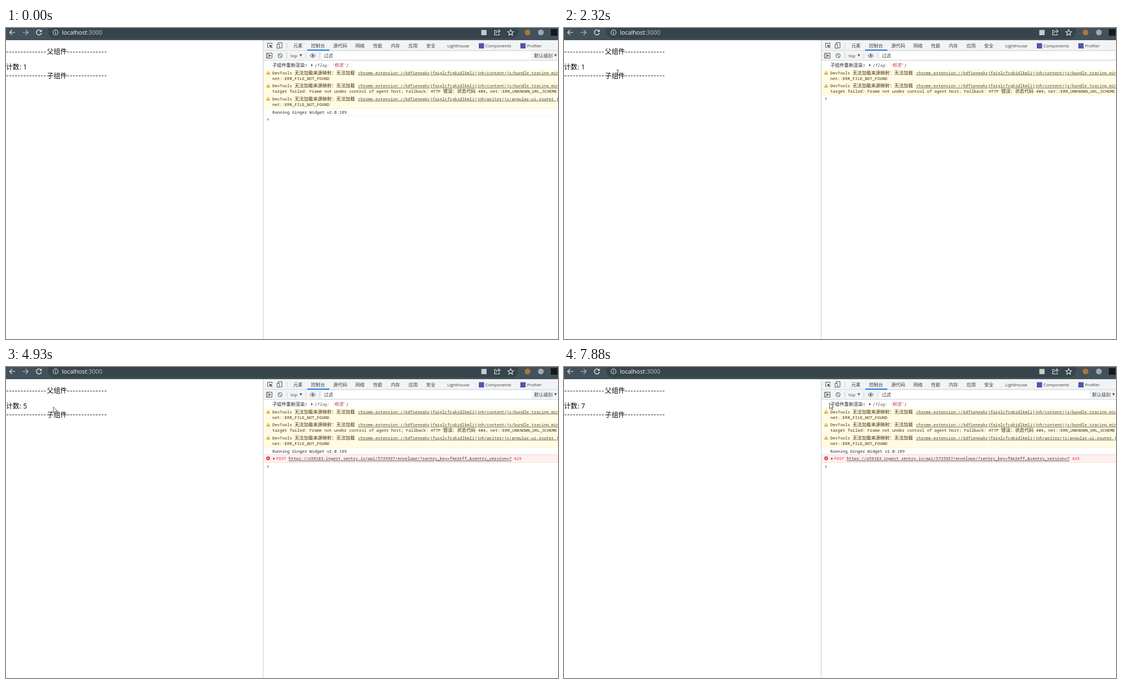
Animation, 997 px wide and 562 px high, one loop 8000 ms. Source, as an HTML page:

```html
<!DOCTYPE html>
<html lang="zh-CN">
<head>
<meta charset="utf-8">
<title>父子组件渲染</title>
<style>
html, body { margin: 0; width: 100%; height: 100%; overflow: hidden; background: #fff; }
svg { display: block; width: 997px; height: 562px; }
text { white-space: pre; }
.ui { font: 7.75px 'Open Sans', 'Noto Sans', sans-serif; fill: #3c4043; }
.cjk { font: 8.4px 'Noto Sans CJK SC', 'Noto Sans CJK', sans-serif; fill: #3c4043; }
.mono { font: 7.46px 'Noto Sans Mono', 'Noto Sans CJK SC', monospace; fill: #222; }
.mono .han { font-size: 8.4px; }
.page { font: 12.1px 'Noto Sans CJK SC', 'Noto Sans CJK', sans-serif; fill: #000; }
.latin { font: 12.3px 'Open Sans', 'Noto Sans', sans-serif; fill: #000; }
.dash { font: 13.5px 'Open Sans', 'Noto Sans', sans-serif; letter-spacing: .84px; fill: #111; }
.address { font: 10.8px 'Open Sans', 'Noto Sans', sans-serif; fill: #f8f9fa; }
.mono.warn { fill: #452b00; }
.mono.link { fill: #45432f; text-decoration: underline; }
.mono.error { fill: #e52b2b; }
.mono.url { fill: #3d2e31; text-decoration: underline; }
.mono.object { font-style: italic; fill: #565656; }
.string { fill: #c8262b; }
.line { fill: none; stroke: #50565b; stroke-width: 1; }
.light { fill: none; stroke: #e3e8ea; stroke-width: 1.1; }
</style>
</head>
<body>
<svg id="stage" viewBox="0 0 997 562"></svg>
<script>
const LOOP = 8000;

const text = (x, y, cls, str) => `<text x="${x}" y="${y}" class="${cls}">${str}</text>`;
const rect = (x, y, w, h, fill, extra = '') =>
  `<rect x="${x}" y="${y}" width="${w}" height="${h}" fill="${fill}" ${extra}/>`;
const path = (d, cls, extra = '') => `<path d="${d}" class="${cls}" ${extra}/>`;
const circle = (x, y, r, extra) => `<circle cx="${x}" cy="${y}" r="${r}" ${extra}/>`;
const group = (id, content) => `<g id="${id}">${content}</g>`;
const han = str => `<tspan class="han">${str}</tspan>`;

function browserBar() {
  return rect(0, 0, 997, 22, '#43525a') + rect(76, -8, 849, 27, '#37444b', 'rx="12"') +
    path('M16.500 8H7M11 3.500L6.500 8L11 12.500', 'light') +
    path('M30 8H39.500M35.500 3.500L40 8L35.500 12.500', 'light', 'opacity=".75"') +
    group('hover', circle(59.5, 8, 10.5, 'fill="#5b6970"')) +
    group('reload', path('M63 5A4.600 4.600 0 1 0 64 9', 'light', 'style="stroke-width:1.400"') +
      '<path d="M64.500 2.800V7H60.300Z" fill="#e3e8ea"/>') +
    group('stop', path('M55.500 4L63.500 12M63.500 4L55.500 12', 'light', 'style="stroke-width:1.300"')) +
    circle(89.5, 8, 4.5, 'class="light"') + path('M89.500 7.300V10.500M89.500 5.300V6.300', 'light') +
    text(101, 12, 'address', 'localhost<tspan fill="#bdc5c9">:3000</tspan>') +
    group('translate', rect(858.5, 3.5, 9.5, 9.5, '#c4cbcf')) +
    path('M886 4.500H882.500V12.500H891V10M885 9.500Q885.500 5.800 890 5.800M889 3L892.500 5.800L889 8.500', 'light') +
    path('M911.500 3L913 6.500L916.700 6.800L913.900 9.300L914.800 13L911.500 11L908.200 13L909.100 9.300L906.300 6.800L910 6.500Z', 'light') +
    circle(942, 8, 5.2, 'fill="#a8763c"') + circle(966, 8, 5.2, 'fill="#9daab0"') +
    rect(984, 2, 12, 12, '#17191b');
}

function page() {
  const heading = (y, name) => text(0.5, y - .6, 'dash', '-'.repeat(14)) +
    text(73.8, y, 'page', name) + text(110, y - .6, 'dash', '-'.repeat(14));
  return heading(47.4, '父组件') + heading(90.6, '子组件') +
    text(0, 75.2, 'page', '计数') + text(24.5, 75, 'latin', ':') +
    '<text id="count" x="31" y="75" class="latin"></text>';
}

function devtools() {
  const tabs = [[519, '元素'], [551, '控制台'], [591, '源代码'], [631, '网络'],
    [663, '性能'], [695, '内存'], [727, '应用'], [759, '安全']];
  const divider = (x, y) => rect(x, y, 1, 10, '#cfd2d5');
  return rect(465, 22, 532, 37, '#f1f3f4') + rect(464, 22, 1, 540, '#c9cccf') +
    rect(465, 40, 532, 1, '#d3d6d9') + rect(465, 58, 532, 1, '#d3d6d9') +
    rect(544, 39, 40, 2, '#1a73e8') +
    path('M475 35H472.500V27.500H480.500V30', 'line') +
    '<path d="M475.500 30L481.500 32.300L479 33.300L481.300 35.800L480.300 36.600L478 34.200L476.800 36.300Z" fill="#50565b"/>' +
    path('M491.500 29V26.500H498.500V36H494.500M489.500 29.500H494V36.500H489.500Z', 'line') + divider(507, 27) +
    tabs.map(([x, name]) => text(x, 35.200, 'cjk', name)).join('') +
    rect(854, 27.5, 9.5, 9.5, '#5254ae') + rect(929, 27.5, 9.5, 9.5, '#5254ae') +
    text(797, 34.8, 'ui', 'Lighthouse') + text(866, 34.8, 'ui', 'Components') + text(941, 34.8, 'ui', 'Profiler') +
    group('sidebar', path('M470.500 45.500H480.500V54.500H470.500ZM473 45.500V54.500', 'line') +
      '<path d="M475 47.500L479 50L475 52.500Z" fill="#50565b"/>') +
    circle(495, 50, 3.8, 'class="line"') + path('M492.300 47.300L497.700 52.700', 'line') + divider(507, 45) +
    text(514, 52.8, 'ui', 'top') + '<path d="M530 47.500H535L532.500 51.800Z" fill="#50565b"/>' + divider(541, 45) +
    path('M549 50Q554 43.500 559 50Q554 56.500 549 50Z', 'line') + circle(554, 50, 1.8, 'fill="#50565b"') + divider(566, 45) +
    '<rect id="filter" x="571" y="42.500" height="14" fill="#fff"/>' + text(574, 53, 'cjk', '过滤') +
    group('levels', text(954, 53, 'cjk', '默认级别') + '<path d="M990 47.500H995L992.500 51.800Z" fill="#50565b"/>');
}

function consoleRows() {
  const extension = 'chrome-extension://kdfieneakcjfaiglcfcgkidlkmlijjnh/';
  const warning = (y, file, detail) =>
    rect(465, y, 532, 23.5, '#fffbe5') + rect(465, y + 23, 532, .8, '#fff5c2') +
    `<path d="M473.500 ${y + 2.200}L477.300 ${y + 9}H469.700Z" fill="#e8a20c"/>` +
    rect(473, y + 4.5, 1, 2.3, '#fff') + rect(473, y + 7.3, 1, .9, '#fff') +
    text(481, y + 8.7, 'mono warn', 'DevTools ' + han('无法加载来源映射：无法加载')) +
    text(636, y + 8.7, 'mono link', extension + file) +
    text(481, y + 18.6, 'mono warn', detail);
  const notFound = 'net::ERR_FILE_NOT_FOUND';
  const arrow = (x, y) => `<path d="M${x} ${y - 2}L${x + 3.500} ${y}L${x} ${y + 2}Z" fill="#444"/>`;

  return group('row1', text(481, 70.2, 'mono', han('子组件重新渲染') + '!') + arrow(551, 67.3) +
      text(557, 69.6, 'mono object', `{flag: <tspan class="string">'${han('标志')}'</tspan>}`)) +
    group('row2', warning(75, 'content/js/bundle.tracing.min.js', notFound) +
      warning(98.5, 'content/js/bundle.tracing.min.js', 'target failed: Frame not under control of agent host; Fallback: HTTP ' +
        han('错误：状态代码') + ' 404' + han('，') + 'net::ERR_UNKNOWN_URL_SCHEME')) +
    group('row3', warning(122, 'writer/js/angular-ui-router.js', notFound) +
      text(481, 154.5, 'mono', 'Running Ginger Widget v2.0.189') + rect(465, 157.5, 532, .8, '#efefef')) +
    group('row4', rect(465, 158, 532, 15, '#fff0f0') + rect(465, 158, 532, .8, '#ffd6d6') + rect(465, 172.3, 532, .8, '#ffd6d6') +
      circle(473.5, 165, 3.4, 'fill="#e0383e"') + path('M472.200 163.700L474.800 166.300M474.800 163.700L472.200 166.300', '', 'stroke="#fff"') +
      arrow(482.5, 165.8) + text(488, 168.4, 'mono error', 'POST') +
      text(510.5, 168.4, 'mono url', 'https://o59183.ingest.sentry.io/api/5735937/envelope/?sentry_key=f4e2eff…&amp;sentry_version=7') +
      text(917.5, 168.4, 'mono error', '429')) +
    group('prompt', path('M472 -2L474.300 0L472 2', '', 'fill="none" stroke="#4b8fe8" stroke-width="1.100"'));
}

const pointers = group('pointer',
  group('arrow', '<path d="M0 0V10.500L2.500 8.300L4.300 12L6 11.200L4.300 7.700H7.500Z" fill="#fff" stroke="#333" stroke-width=".8"/>') +
  group('beam', path('M-2 -4H2M0 -4V5M-2 5H2', '', 'fill="none" stroke="#333" stroke-width=".9"')));

document.getElementById('stage').innerHTML = page() + browserBar() + devtools() + consoleRows() + pointers;
const $ = id => document.getElementById(id);
const show = (id, on) => $(id).setAttribute('display', on ? 'inline' : 'none');

// Pointer waypoints: time, x, y
const route = [
  [70, 985, 531], [830, 58, 26], [1060, 60, 6], [1200, 60, 6], [1390, 68.5, 79.5], [1650, 100, 184],
  [1720, 102, 165], [2050, 110, 104], [2320, 97, 80], [2530, 95, 75], [2930, 85.5, 72], [6050, 85.5, 72],
  [6250, 55, 42], [6450, 2, 62], [6650, 12, 99], [6830, 20, 95], [7000, 250, 66], [7190, 488.5, 38],
  [7330, 536, 24], [7600, 494, 66], [7880, 479.5, 65]];
const clicks = [3260, 3800, 4400, 4930, 5520, 6050];
const rowTimes = [1790, 1990, 2530, 2860];
const promptY = [66, 81, 127.5, 165, 180];

function pointerAt(t) {
  const next = route.findIndex(p => p[0] > t);
  if (next < 0) return route[route.length - 1];
  const b = route[next], a = route[Math.max(next - 1, 0)];
  const k = b === a ? 0 : (t - a[0]) / (b[0] - a[0]);
  return a.map((v, i) => v + (b[i] - v) * k);
}

const passed = (times, t) => times.filter(time => t >= time).length;

function draw(t) {
  const loading = t >= 1190 && t < 1860;
  const rows = t < 1260 ? 3 : passed(rowTimes, t);
  show('hover', t >= 990 && t < 1450);
  show('stop', loading);
  show('reload', !loading);
  show('translate', !loading);
  for (let i = 1; i <= 4; i++) show('row' + i, i <= rows);
  $('prompt').setAttribute('transform', `translate(0 ${promptY[rows]})`);
  show('levels', rows > 2);
  $('filter').setAttribute('width', rows > 2 ? 378 : 424);
  $('sidebar').style.filter = t >= 7120 && t < 7260 ? 'brightness(.4)' : 'none';
  $('count').textContent = 1 + passed(clicks, t);

  const [, x, y] = pointerAt(t), overText = t >= 2190 && t < 2460;
  show('pointer', t >= 70);
  show('arrow', !overText);
  show('beam', overText);
  $('pointer').setAttribute('transform', `translate(${x} ${y})`);
}

function tick() {
  draw(performance.now() % LOOP);
  requestAnimationFrame(tick);
}
tick();
</script>
</body>
</html>
```
